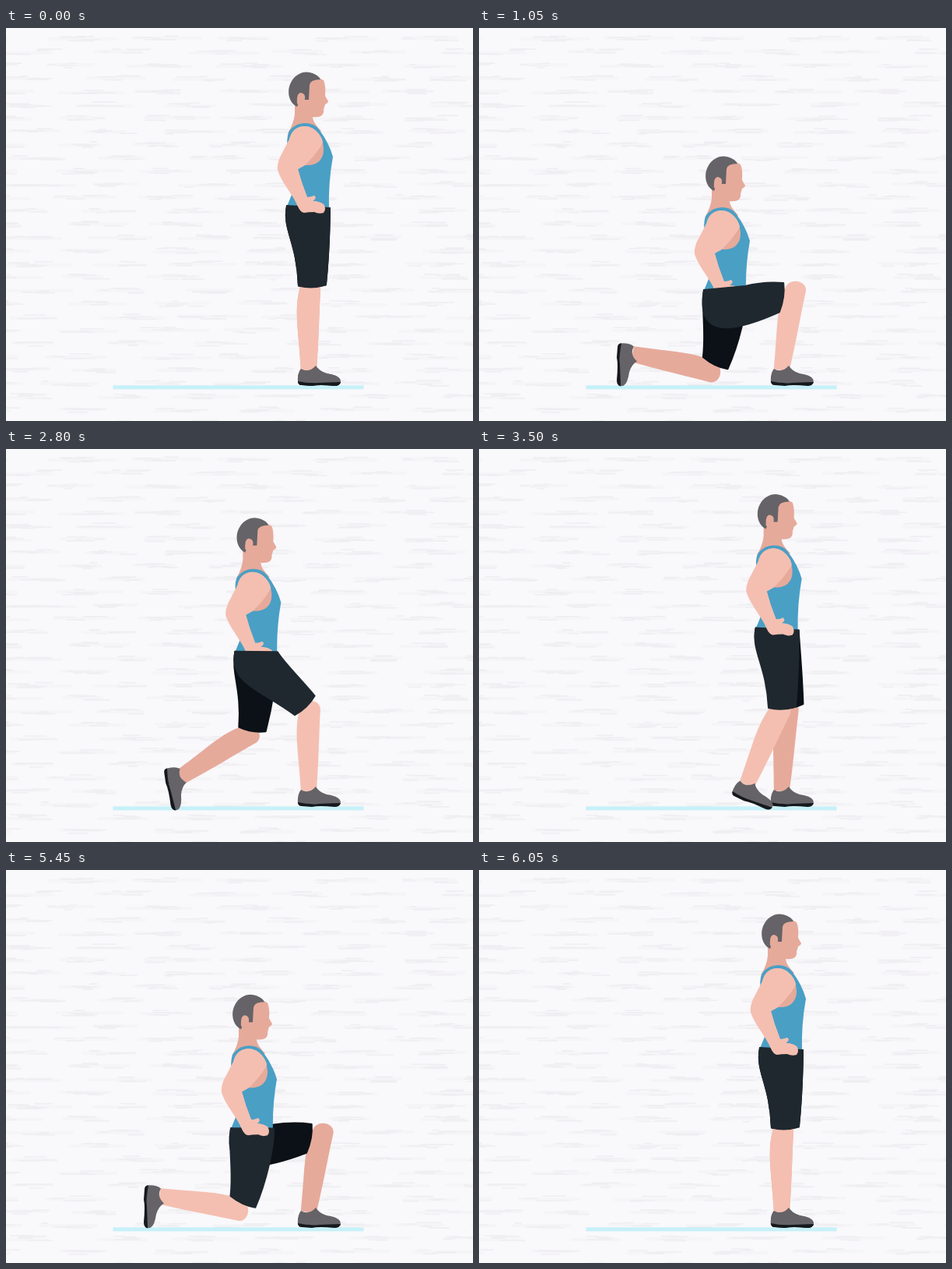
Write an HTML page that moves like this. It is 600 px wide and 504 px high and loops after 6200 ms.

```html
<!DOCTYPE html>
<html lang="en">
<head>
<meta charset="utf-8">
<title>Reverse lunge</title>
<style>
  html, body { margin: 0; width: 100%; height: 100%; overflow: hidden; background: #f9f8fb; }
  svg { display: block; width: 100%; height: 100%; }
  .brush { fill: none; stroke-linecap: round; }
  .near .skin, .arm { fill: #f4bfb1; }
  .far .skin, .shade { fill: #e6aa9b; }
  .near .shorts { fill: #1f282f; stroke: #1f282f; }
  .far .shorts { fill: #0b1116; stroke: #0b1116; }
  .shorts { stroke-width: 2; stroke-linejoin: round; }
  .hair, .shoe { fill: #656367; }
  .sole { fill: #15191d; }
  .vest { fill: #4a9fc5; }
</style>
</head>
<body>
<svg viewBox="0 0 600 504">
  <defs>
    <g id="foot">
      <path class="shoe" d="M-9 0Q1 6 10 -4Q14 3 24 6Q38 8 41 13Q43 18 40 19L-13 18Q-14 6 -9 0Z"/>
      <path class="sole" d="M-13 16Q0 19 14 18L42 17Q41 22 34 22Q14 20 5 22L-8 21Q-13 21 -13 16Z"/>
    </g>
    <path id="arm" class="arm" d="M384 126C396 126 406 138 407 147C400 160 388 172 384 176L375 181L380 198L387 217Q392 217 396 215Q400 218 394 222Q402 222 408 226Q412 232 408 237Q402 239 396 236Q388 236 383 237Q378 236 375 229C370 215 354 198 349 182Q348 176 352 166L364 143C367 131 375 126 384 126Z"/>
  </defs>
  <path id="wash" class="brush" stroke="#f5f4f7" stroke-width="4"/>
  <path id="grain" class="brush" stroke="#efeef1" stroke-width="1.6"/>
  <rect x="137.5" y="458.3" width="322" height="5" fill="#c6f1f8"/>
  <g id="far" class="far">
    <path class="skin"/><use href="#foot"/><path class="shorts"/>
  </g>
  <g class="body">
    <path class="shade" d="M371 92L371 110Q370 122 362 135L400 138L405 132Q394 121 394 114Q402 115 406 112Q409 108 408 105L410 98Q414 96 414 94L410 87Q411 74 408 67L404 65L385 66Z"/>
    <path class="hair" d="M374 101C362 95 361 79 366 70C372 58 384 54 394 58Q402 61 404 66Q391 66 390 73L389 92L383 92L378 90Z"/>
    <path class="shade" d="M374 97Q373 83 379 83Q385 84 384 91Q383 97 377 98Z"/>
    <path class="vest" d="M360 231Q368 212 372 200L363 160Q359 141 364 132Q372 122 384 122Q396 122 402 130Q415 147 420 165Q414 198 415 233Q390 240 360 231Z"/>
    <path class="shade" d="M364 145C366 130 375 126 384 126C398 128 408 142 408 156C408 170 398 177 385 176Z"/>
    <use href="#arm"/>
  </g>
  <g id="near" class="near">
    <path class="skin"/><use href="#foot"/><path class="shorts"/>
  </g>
  <g class="body"><use id="armOver" href="#arm"/></g>
</svg>
<script>
const LOOP = 6200, STEP = 50, MOVE = 650;
const THIGH = 92, SHIN = 102.1;
const HIP = [388, 243], ANKLE = [388, 437], BACK = [199, 417.5];
const $ = id => document.getElementById(id);
const clamp = v => Math.min(1, Math.max(0, v));
const lerp = (a, b, k) => a + (b - a) * k;

// Shorts outlines: buttock and waist relative to the hip,
// then five points as [along, across] the thigh.
const STAND = [-33, 16, 28, -12, 30, -15, 87, -15, 87, 20, 50, 25, 20, 27];
const REAR = [-30, 10, 28, -15, 44, -16, 75, -14, 84, 20, 50, 28, 4, 30];
const FRONT = [-38, 48, 26, -20, 4, -41, 67, -24, 78, 12, 58, 17, 43, 17];
const CALF = [0, -14, 30, -20, 50, -14, 104, -9, 104, 11, 60, 13, 30, 12, 0, 13, -16, 14, -16, -12, 0, -14];

// Maps [along, across] pairs onto the bone from a to b.
function onBone(a, b, list) {
  const dx = b[0] - a[0], dy = b[1] - a[1], len = Math.hypot(dx, dy);
  const ux = dx / len, uy = dy / len, out = [];
  for (let i = 0; i < list.length; i += 2) {
    const s = list[i], n = list[i + 1];
    out.push([a[0] + ux * s + uy * n, a[1] + uy * s - ux * n].map(v => v.toFixed(2)).join(" "));
  }
  return out;
}

function findKnee(hip, ankle) {
  const dx = ankle[0] - hip[0], dy = ankle[1] - hip[1], d = Math.hypot(dx, dy);
  const a = (THIGH ** 2 - SHIN ** 2 + d * d) / (2 * d);
  const h = Math.sqrt(Math.max(0, THIGH ** 2 - a * a));
  return [hip[0] + (dx * a + dy * h) / d, hip[1] + (dy * a - dx * h) / d];
}

function drawLeg(id, hip, ankle, turn, outline, bend) {
  const [skin, foot, shorts] = $(id).children;
  const knee = findKnee(hip, ankle);
  const s = onBone(knee, ankle, CALF);
  skin.setAttribute("d", `M${s[0]}C${s[1]} ${s[2]} ${s[3]}L${s[4]}C${s[5]} ${s[6]} ${s[7]}C${s[8]} ${s[9]} ${s[10]}Z`);
  foot.setAttribute("transform", `translate(${ankle}) rotate(${turn})`);

  const k = STAND.map((v, i) => lerp(v, outline[i], bend));
  const at = (x, y) => `${hip[0] + x} ${hip[1] + y}`;
  const hem = [(k[6] + k[8]) / 2 + 5, (k[7] + k[9]) / 2];
  const [c2, back, front, c3, c4, mid] = onBone(hip, knee, [...k.slice(4), ...hem]);
  shorts.setAttribute("d",
    `M${at(-27, -15)}C${at(k[0], k[1])} ${c2} ${back}Q${mid} ${front}C${c3} ${c4} ${at(k[2], k[3])}Z`);
}

// Progress of one lunge: down from `start`, up again from `rise`.
const depth = (t, start, rise) => clamp((t - start) / MOVE) - clamp((t - rise) / MOVE);

function draw(t) {
  const first = depth(t, 400, 2400), second = depth(t, 3450, 5400);
  const s = first + second;
  const drop = s * s * (2.6 - 1.6 * s);
  const g = clamp(s * MOVE / 300), shift = g * g * (3 - 2 * g);
  const slide = 1 - (1 - clamp(s * MOVE / 400)) ** 2;

  const dx = -72 * shift, dy = 108 * drop;
  const hip = [HIP[0] + dx, HIP[1] + dy];
  const lift = 8 * Math.sin(Math.PI * slide) ** 2;
  const rear = [lerp(ANKLE[0], BACK[0], slide), lerp(ANKLE[1], BACK[1], slide) - lift];

  const [ahead, behind] = first > 0 ? ["near", "far"] : ["far", "near"];
  drawLeg(ahead, hip, ANKLE, 0, FRONT, drop);
  drawLeg(behind, hip, rear, 90 * slide, REAR, drop);
  for (const g of document.querySelectorAll(".body")) g.setAttribute("transform", `translate(${dx} ${dy})`);
  $("armOver").style.display = first > 0.1 ? "none" : "";
}

function paintPaper() {
  let seed = 7, wash = "", grain = "";
  const rnd = () => (seed = seed * 16807 % 2147483647) / 2147483647;
  for (let row = 0; row < 30; row++) {
    const y = 13 + row * 17;
    for (let x = -60 + row % 2 * 50 + rnd() * 20; x < 600; x += 95 + rnd() * 30) {
      wash += `M${x | 0} ${y + rnd() * 3 | 0}h${50 + rnd() * 40 | 0}`;
      for (let i = 0; i < 5; i++)
        grain += `M${x + rnd() * 45 | 0} ${(y - 3 + rnd() * 7).toFixed(1)}h${8 + rnd() * 26 | 0}`;
    }
  }
  $("wash").setAttribute("d", wash);
  $("grain").setAttribute("d", grain);
}

const began = performance.now();
function tick() {
  const t = (performance.now() - began) % LOOP;
  draw(Math.floor(t / STEP) * STEP);
  requestAnimationFrame(tick);
}
paintPaper();
tick();
</script>
</body>
</html>
```
